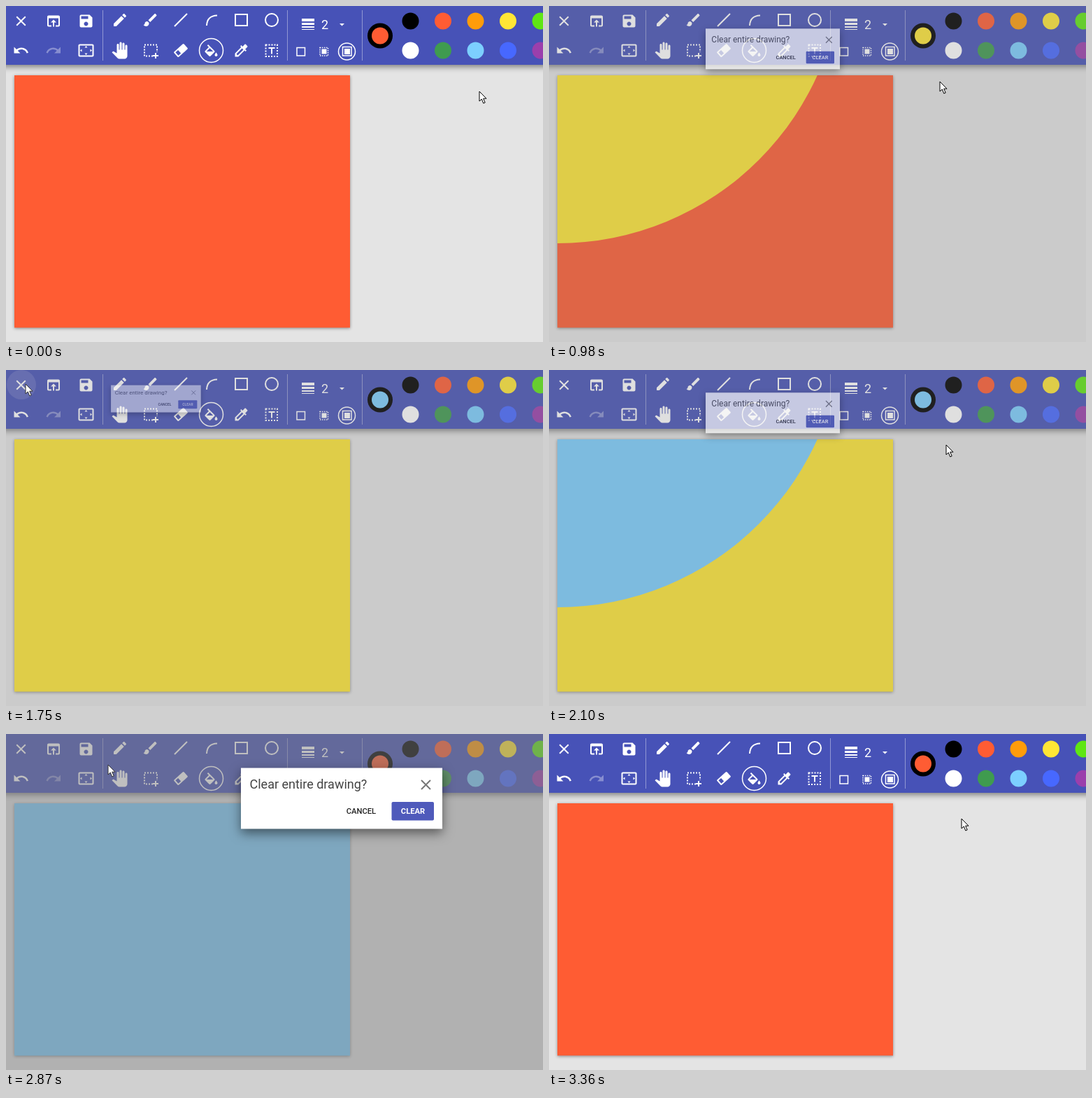
Animation of 768 by 480 pixels, one loop 3430 ms. Source, as an HTML page:

```html
<!DOCTYPE html>
<html lang="en">
<head>
<meta charset="utf-8">
<title>Paint: clearing the drawing</title>
<style>
html, body { margin: 0; width: 100%; height: 100%; overflow: hidden; background: #e4e4e4; }
svg { display: block; width: 768px; height: 480px; font-family: Roboto, sans-serif; }
.line { fill: none; stroke: #fff; stroke-width: 2; }
.thin { fill: none; stroke: #fff; stroke-width: 1.5; }
.dash { fill: none; stroke: #fff; stroke-width: 2; stroke-dasharray: 2 2; }
#bar { filter: drop-shadow(0 3px 4px rgba(0,0,0,.45)); }
#paper { filter: drop-shadow(0 1px 2px rgba(0,0,0,.4)); }
#box { filter: drop-shadow(0 6px 8px rgba(0,0,0,.5)); }
</style>
</head>
<body>
<svg viewBox="0 0 768 480">
  <clipPath id="page"><rect x="12" y="99" width="480" height="360.5"/></clipPath>
  <rect width="768" height="480" fill="#e4e4e4"/>
  <rect id="paper" x="12" y="99" width="480" height="360.5"/>
  <g clip-path="url(#page)"><circle id="wipe" cx="12" cy="-69"/></g>

  <rect id="bar" x="-20" y="-20" width="808" height="104" fill="#4752b7"/>
  <path d="M138.5 6V78M402.5 6V78M509.5 6V78" stroke="#fff" opacity=".4"/>
  <circle id="ripple" cx="22" cy="21" r="21" fill="#fff"/>
  <g id="icons" fill="#fff"></g>

  <path class="line" d="M241 29L259 11M287 28Q287.500 14 302 13.500M328 12h17v16h-17z"/>
  <circle class="line" cx="380" cy="20" r="9"/>
  <path class="dash" d="M198 55.500h18v16h-18z"/>
  <path d="M210 66h9v9h-9z" fill="#4752b7"/>
  <path class="line" d="M214 67v8M210 71h8"/>
  <g transform="translate(250 63.500) rotate(-42)">
    <rect x="-9.500" y="-5" width="19" height="10" rx="1.500" fill="#fff"/>
    <path d="M-7.500-3h5v6h-5z" fill="#4752b7"/>
  </g>
  <circle class="thin" cx="293.500" cy="63.500" r="17"/>
  <path class="dash" d="M371.500 55.500h16.500v16.500h-16.500z"/>
  <path class="line" d="M375.500 60h9M380 60v8.500"/>

  <text x="451" y="33" font-size="18" fill="#fff">2</text>
  <path d="M477 25h7l-3.500 3.500z" fill="#fff"/>
  <path class="thin" d="M416 59.500h11.500v11.500h-11.500z"/>
  <path class="thin" d="M449 59.500h11.500v11.500h-11.500z" stroke-dasharray="1.500 1.500"/>
  <path d="M451.500 61.500h7v7h-7zM484 61h8v8h-8z" fill="#fff"/>
  <path class="thin" d="M481.500 58.500h12.500v12.500h-12.500z"/>
  <circle class="thin" cx="487.500" cy="65" r="12"/>
  <circle cx="535" cy="42.500" r="18"/>
  <circle id="chosen" cx="535" cy="42.500" r="12"/>
  <g id="swatches"></g>

  <rect id="scrim" width="768" height="480" fill="#808080"/>
  <g id="dialog">
    <rect id="box" x="336" y="48.500" width="288" height="87" fill="#fff"/>
    <text x="348.500" y="77.500" font-size="18" fill="#444">Clear entire drawing?</text>
    <path d="M594 66l13 13M607 66l-13 13" stroke="#777" stroke-width="2"/>
    <rect x="551.500" y="97" width="60.500" height="26.500" rx="2" fill="#4f5abb"/>
    <g font-size="11.200" text-anchor="middle">
      <text x="508" y="114" font-weight="500" fill="#222">CANCEL</text>
      <text x="582" y="114" font-weight="700" fill="#fff">CLEAR</text>
    </g>
  </g>
  <path id="cursor" d="M0 0V14L3.300 11 5.800 17 8.200 16 5.700 10.200H10z" stroke-linejoin="round"/>
</svg>
<script>
const $ = id => document.getElementById(id);
const LOOP = 3430, STEP = 70;
const RED = '#ff5c33', YELLOW = '#ffe635', BLUE = '#7ccfff';

// Icons on a 24-unit grid: centre x, centre y, outline, opacity
const undo = 'M12.5 8c-2.65 0-5.05.99-6.9 2.6L2 7v9h9l-3.62-3.62c1.39-1.16 3.16-1.88 5.12-1.88 3.54 0 6.55 2.31 7.6 5.5l2.37-.78C21.08 11.03 17.15 8 12.5 8z';
const icons = [
  [21.5, 21.5, 'M19 6.41L17.59 5 12 10.59 6.41 5 5 6.41 10.59 12 5 17.59 6.41 19 12 13.41 17.59 19 19 17.59 13.41 12z'],
  [68, 21.5, 'M19 4H5c-1.11 0-2 .9-2 2v12c0 1.1.89 2 2 2h4v-2H5V8h14v10h-4v2h4c1.1 0 2-.9 2-2V6c0-1.1-.89-2-2-2zm-7 6l-4 4h3v6h2v-6h3l-4-4z'],
  [114.5, 21.5, 'M17 3H5c-1.11 0-2 .9-2 2v14c0 1.1.89 2 2 2h14c1.1 0 2-.9 2-2V7l-4-4zm-5 16c-1.66 0-3-1.34-3-3s1.34-3 3-3 3 1.34 3 3-1.34 3-3 3zm3-10H5V5h10v4z'],
  [21.5, 63.5, undo],
  [114.5, 63.5, 'M12 5.5L10 8h4zM18 10v4l2.500-2zM6 10l-2.500 2L6 14zM14 16h-4l2 2.500zM21 3H3c-1.100 0-2 .9-2 2v14c0 1.100.9 2 2 2h18c1.100 0 2-.9 2-2V5c0-1.100-.9-2-2-2zm0 16H3V5h18z'],
  [163, 20, 'M3 17.25V21h3.75L17.81 9.94l-3.75-3.75L3 17.25zM20.71 7.04c.39-.39.39-1.02 0-1.41l-2.34-2.34c-.39-.39-1.02-.39-1.41 0l-1.83 1.83 3.75 3.75 1.83-1.83z'],
  [206.5, 20, 'M7 14c-1.66 0-3 1.34-3 3 0 1.31-1.16 2-2 2 .92 1.22 2.49 2 4 2 2.21 0 4-1.79 4-4 0-1.66-1.34-3-3-3zm13.71-9.37l-1.34-1.34c-.39-.39-1.02-.39-1.41 0L9 12.25 11.75 15l8.96-8.96c.39-.39.39-1.02 0-1.41z'],
  [162.5, 63.5, 'M23 5.500V20c0 2.200-1.800 4-4 4h-7.300c-1.080 0-2.100-.43-2.850-1.190L1 14.830s1.260-1.230 1.300-1.250c.4-.3.900-.4 1.390-.13L8 15.910V4c0-2 3-2 3 0v7h1V1.500c0-2 3-2 3 0V11h1V2.500c0-2 3-2 3 0V11h1V5.500c0-2 3-2 3 0z'],
  [293.5, 67, 'M16.56 8.94L7.62 0 6.21 1.41l2.38 2.38-5.15 5.15c-.59.59-.59 1.54 0 2.12l5.5 5.5c.59.59 1.53.59 2.12 0l5.5-5.5c.59-.58.59-1.53 0-2.12zM5.21 10L10 5.21 14.79 10H5.21zM19 11.5s-2 2.17-2 3.5c0 1.1.9 2 2 2s2-.9 2-2c0-1.33-2-3.5-2-3.5z'],
  [336.5, 63.5, 'M20.71 5.63l-2.34-2.34c-.39-.39-1.02-.39-1.41 0l-3.12 3.12-1.93-1.91-1.41 1.41 1.42 1.42L3 16.25V21h4.75l8.92-8.92 1.42 1.42 1.41-1.41-1.92-1.92 3.12-3.12c.4-.4.4-1.03.01-1.42zM6.92 19L5 17.08l8.06-8.06 1.92 1.92L6.92 19z'],
  [432, 26, 'M3 17h18v-2H3zM3 20h18v-1H3zM3 13h18v-3H3zM3 4v4h18V4z']
];
$('icons').innerHTML = icons.map(([x, y, d]) =>
  `<path transform="translate(${x - 12} ${y - 12})" d="${d}"/>`).join('') +
  `<path transform="translate(80 51.5) scale(-1 1)" opacity=".35" d="${undo}"/>`;

const palette = ['#000', RED, '#ff9c0a', YELLOW, '#5fe614', '#fff', '#3f9b4f', BLUE, '#4768ff', '#9b3fac'];
$('swatches').innerHTML = palette.map((c, i) =>
  `<circle cx="${578.5 + i % 5 * 46.5}" cy="${i < 5 ? 21.5 : 63.5}" r="12" fill="${c}"/>`).join('');

// Each round: pick a colour, open the dialog, confirm
const rounds = [
  { pick: 210, open: 563, clear: 930, from: RED, to: YELLOW },
  { pick: 1330, open: 1683, clear: 2050, from: YELLOW, to: BLUE },
  { pick: 2420, open: 2683, clear: 3060, from: BLUE, to: RED }
];

// Pointer stops: time, x, y
const stops = [
  [0, 677, 122], [70, 724, 66], [150, 716, 22], [250, 717, 23], [500, 18, 20], [630, 14, 18],
  [910, 577, 109], [980, 559, 108], [1060, 580, 104], [1280, 671, 62], [1380, 670, 62],
  [1610, 24, 20], [1750, 28, 20], [2030, 577, 108], [2100, 568, 107], [2170, 580, 102],
  [2380, 624, 22], [2450, 623, 22], [2640, 22, 19], [2760, 22, 20], [2870, 146, 44],
  [3010, 577, 109], [3150, 575, 109], [3360, 590, 121], [LOOP, 677, 122]
];

const clamp = v => Math.max(0, Math.min(1, v));
const set = (id, attrs) => { for (const k in attrs) $(id).setAttribute(k, attrs[k]); };

function pointer(t) {
  const i = stops.findIndex(s => s[0] > t);
  const [t0, x0, y0] = stops[i - 1], [t1, x1, y1] = stops[i];
  const p = (t - t0) / (t1 - t0), e = p * p * (3 - 2 * p);
  return [x0 + (x1 - x0) * e, y0 + (y1 - y0) * e];
}

function draw(t) {
  const round = rounds.findLast(r => t >= r.pick);
  const r = round || rounds[0];
  const closing = t >= r.clear;
  const size = closing ? 1 - clamp((t - r.clear) / 150) : clamp((t - r.open) / 150);
  set('paper', { fill: r.from });
  set('wipe', { fill: r.to, r: closing ? Math.min(760, 168 + 4.8 * (t - r.clear)) : 0 });
  set('chosen', { fill: round ? r.to : RED });
  set('scrim', { opacity: (closing ? size ** 1.7 : Math.min(1, size * 1.12)) / 2 });
  set('dialog', { opacity: size, transform: `scale(${size})` });
  const pressed = t - r.open;
  set('ripple', { opacity: pressed > -70 && pressed < 150 ? .13 : 0 });

  const [x, y] = pointer(t);
  // White arrow over the toolbar, outlined in black over the page
  const overBar = t >= r.open && !closing && y < 84;
  set('cursor', {
    transform: `translate(${x} ${y})`,
    fill: '#fff',
    stroke: overBar ? '#333' : '#000'
  });
}

function tick() {
  const t = performance.now() % LOOP;
  draw(Math.floor(t / STEP) * STEP);
  requestAnimationFrame(tick);
}
tick();
</script>
</body>
</html>
```
